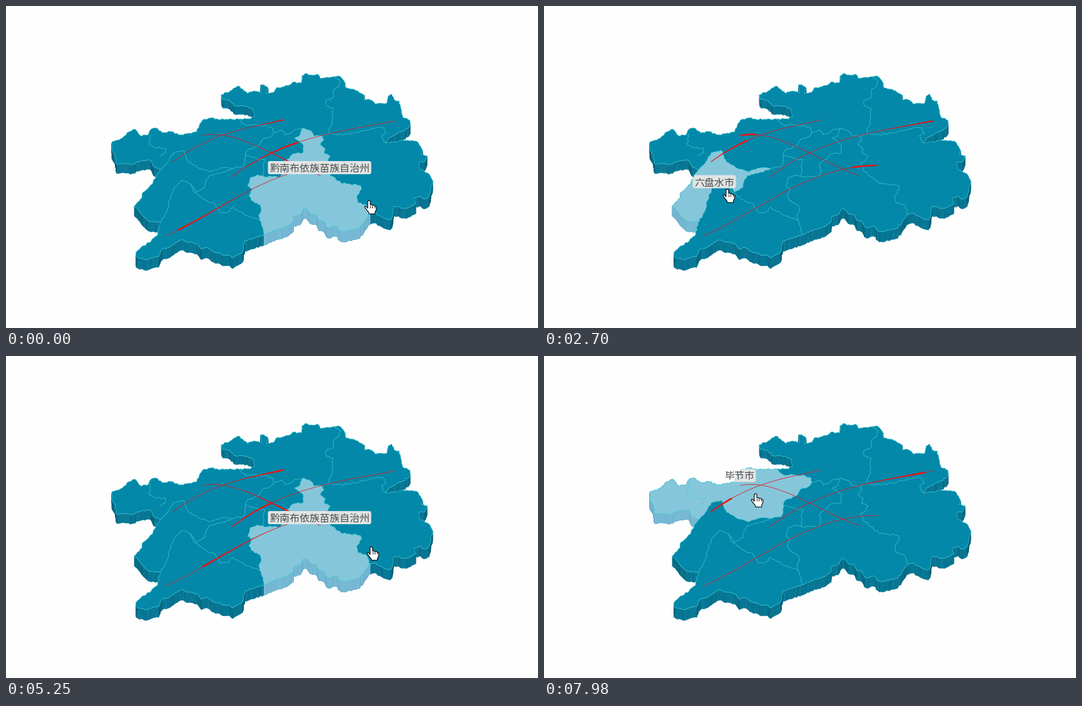
Write a matplotlib script that moves like this. It is 850x515 px and loops after 8 s.

```python
import numpy as np
import matplotlib.pyplot as plt
from matplotlib.animation import FuncAnimation
from matplotlib.collections import LineCollection, PolyCollection
from matplotlib.patches import FancyBboxPatch, Polygon

W, H, DPI = 850, 515, 100
LOOP, INTERVAL, TICK = 8000, 40, 135.3
PX = 72 / DPI
TOP, TOP_LIT, RIM, RED = "#0388a9", "#86c6da", "#43d3d8", "#ee1212"
WALL, WALL_LIT = np.array([.02, .47, .59]), np.array([.47, .73, .84])

# Borders between junctions; the two letters name the end junctions.
ARCS = {
    "ab": [247, 262, 236, 257, 231, 247, 216, 248, 202, 253, 177, 253, 175, 240, 169, 229,
           170, 217, 186, 211, 197, 201, 206, 197, 214, 207, 226, 207, 232, 197, 239, 195,
           250, 203, 263, 201, 280, 206, 296, 204, 305, 201, 310, 188, 317, 181, 328, 179,
           340, 182, 352, 181, 372, 181],
    "bc": [372, 181, 390, 181, 397, 176, 394, 165, 385, 160, 364, 159, 358, 152, 347, 150,
           344, 142, 358, 136, 370, 128, 378, 133, 386, 140, 396, 136, 408, 139, 407, 126,
           412, 126, 419, 132, 416, 140, 428, 138, 432, 131, 444, 129, 452, 127, 458, 122,
           472, 123, 473, 112, 478, 108, 490, 111, 498, 109, 502, 116, 514, 114, 524, 113],
    "cd": [524, 113, 534, 113, 540, 120, 543, 131, 552, 133, 562, 136, 568, 140, 573, 143,
           572, 150, 582, 150, 590, 157, 608, 156, 611, 144, 616, 141, 620, 150, 628, 152,
           634, 178, 645, 183, 646, 190, 638, 199, 625, 204, 614, 210, 606, 219],
    "de": [606, 219, 622, 217, 640, 215, 655, 216, 660, 222, 666, 232, 663, 238, 673, 240,
           668, 250, 660, 250, 662, 262, 675, 268, 682, 280, 679, 292, 676, 305, 668, 309,
           662, 304, 652, 308, 655, 316, 640, 324, 620, 320, 618, 334, 614, 342, 600, 337,
           588, 331, 582, 333],
    "ef": [582, 333, 576, 340, 570, 350, 562, 356, 545, 360, 536, 361, 527, 352, 518, 355,
           512, 353, 508, 345, 500, 343, 494, 333, 486, 332, 480, 324, 476, 324, 470, 334,
           460, 336, 459, 345, 450, 352, 435, 357, 412, 366],
    "fg": [412, 366, 395, 372, 381, 376, 378, 393, 370, 398, 362, 403, 357, 398, 345, 398,
           332, 393, 320, 386, 312, 389, 305, 380, 290, 378, 280, 374, 265, 383, 249, 390,
           244, 401, 230, 404, 223, 406, 208, 401, 208, 394, 218, 384, 232, 376, 243, 364,
           246, 346],
    "ga": [246, 346, 232, 345, 224, 341, 217, 334, 212, 327, 205, 320, 210, 314, 217, 307,
           219, 298, 234, 285, 240, 270, 247, 262],
    "bh": [372, 181, 376, 186, 385, 191, 398, 190, 418, 192, 427, 196, 428, 202],
    "hi": [428, 202, 440, 198, 446, 206, 456, 203, 462, 197, 473, 196],
    "ij": [473, 196, 482, 198, 490, 203, 492, 208, 505, 208],
    "jk": [505, 208, 517, 204],
    "kc": [517, 204, 517, 195, 522, 187, 521, 175, 522, 163, 512, 160, 511, 152, 524, 145,
           524, 133, 531, 129, 534, 120, 524, 113],
    "kd": [517, 204, 530, 206, 550, 204, 570, 200, 590, 195, 603, 195, 608, 203, 600, 208,
           606, 219],
    "je": [505, 208, 508, 214, 502, 222, 510, 228, 508, 236, 518, 240, 514, 248, 506, 252,
           510, 262, 522, 273, 535, 283, 550, 285, 566, 287, 568, 293, 560, 305, 563, 315,
           575, 318, 582, 333],
    "in": [473, 196, 470, 206, 461, 211, 475, 222, 474, 235, 460, 236, 450, 245, 440, 252,
           442, 265, 438, 273, 412, 273],
    "np": [412, 273, 402, 270, 390, 275, 386, 288, 394, 293, 388, 303, 392, 311, 406, 318,
           408, 325, 404, 335, 406, 343],
    "pf": [406, 343, 409, 352, 412, 366],
    "hm": [428, 202, 424, 208, 410, 213, 405, 222, 395, 228, 385, 231, 382, 238],
    "mn": [382, 238, 398, 243, 414, 246, 411, 258, 412, 273],
    "mr": [382, 238, 382, 248, 379, 257, 362, 260],
    "ra": [362, 260, 345, 259, 325, 265, 313, 261, 303, 255, 292, 250, 287, 240, 284, 231,
           267, 235, 258, 250, 247, 262],
    "rq": [362, 260, 345, 266, 325, 271, 320, 278, 318, 290, 304, 298, 294, 284],
    "qp": [294, 284, 301, 298, 318, 310, 335, 318, 343, 331, 355, 330, 362, 322, 375, 329,
           386, 336, 406, 343],
    "qg": [294, 284, 280, 279, 268, 292, 262, 310, 256, 330, 246, 346],
}
COASTS = ["ab", "bc", "cd", "de", "ef", "fg", "ga"]
SPUR = [231, 204, 229, 222, 237, 226, 256, 228, 255, 235, 246, 240]

# name: (ring of junctions, label centre)
REGIONS = {
    "黔南布依族苗族自治州": ("efpnij", (501, 258.5)),
    "铜仁市": ("cdk", (622, 167.5)),
    "毕节市": ("abhmr", (312, 191)),
    "黔西南布依族苗族自治州": ("fgqp", (252, 351)),
    "黔东南苗族侗族自治州": ("dejk", (598, 250)),
    "遵义市": ("bckjih", (455, 157)),
    "贵阳市": ("hinm", (431, 232)),
    "六盘水市": ("garq", (272, 281)),
    "安顺市": ("mnpqr", (356, 300)),
}
(QIANNAN, TONGREN, BIJIE, QIANXINAN, QIANDONGNAN,
 ZUNYI, GUIYANG, LIUPANSHUI, ANSHUN) = REGIONS

# (start ms, hovered region)
HOVER = [(0, QIANNAN), (260, QIANDONGNAN), (660, TONGREN), (1420, QIANNAN),
         (1550, GUIYANG), (1690, BIJIE), (2500, LIUPANSHUI), (2900, QIANXINAN),
         (3800, ANSHUN), (4130, QIANNAN), (5390, QIANDONGNAN), (5900, TONGREN),
         (6600, ZUNYI), (7350, BIJIE)]
# Pointer tip: ms, x, y
POINTER = np.array([
    (0, 580, 311), (400, 603, 250), (800, 585, 185), (1100, 540, 190), (1350, 487, 205),
    (1650, 420, 207), (1920, 366, 206), (2400, 318, 250), (2900, 277, 320),
    (3510, 274, 349), (3900, 350, 325), (4300, 430, 325), (4800, 525, 318),
    (5250, 582, 308), (5600, 605, 270), (5950, 595, 200), (6330, 569, 196),
    (6750, 490, 180), (7250, 408, 190), (7600, 360, 210), (7980, 338, 220)])

# Flight paths in travel order, with the head's position at time zero.
FLIGHTS = [
    ([267, 249, 303, 226, 345, 207, 390, 194, 443, 182], 1.16),
    ([314, 207, 345, 207, 375, 213, 425, 236, 470, 257, 502, 271], .92),
    ([361, 273, 425, 235, 465, 218, 520, 204, 570, 193, 621, 184], .42),
    ([532, 255, 490, 259, 448, 269, 400, 290, 330, 328, 256, 367], .935),
]
SPEED, CYCLE, TAIL, HEAD_WIDTH = .2555e-3, 1.5, .45, 2.7


def pairs(flat):
    return np.array(flat, float).reshape(-1, 2)


def roughen(flat, seed, step=3.0, amount=1.25):
    """Break a polyline into short, slightly ragged pieces."""
    rng = np.random.RandomState(seed)
    pts = pairs(flat)
    out = [pts[:1]]
    for p, q in zip(pts, pts[1:]):
        length = np.hypot(*(q - p))
        n = max(1, int(length / step))
        s = np.linspace(0, 1, n + 1)[1:, None]
        offset = rng.uniform(-amount, amount, (n, 1))
        offset[-1] = 0
        normal = np.array([p[1] - q[1], q[0] - p[0]]) / length
        out.append(p + (q - p) * s + normal * offset)
    return np.vstack(out)


arcs = {key: roughen(flat, i) for i, (key, flat) in enumerate(ARCS.items())}


def ring(nodes):
    parts = []
    for a, b in zip(nodes, nodes[1:] + nodes[0]):
        parts.append(arcs[a + b] if a + b in arcs else arcs[b + a][::-1])
    return np.vstack(parts)


def walls(coast, base):
    """Vertical faces hanging from a coast line, shaded by direction."""
    quads, colors = [], []
    for p, q in zip(coast, coast[1:]):
        d = q - p
        quads.append([p, q, q + (0, drop(q)), p + (0, drop(p))])
        shade = .68 + .32 * abs(d[0]) / (np.hypot(*d) + 1e-6)
        colors.append(tuple(base * (shade if base is WALL else .8 + shade / 5)))
    return quads, colors


def drop(p):
    return 13 + (p[1] - 110) * .014


def add_walls(keys, base, z):
    quads, colors = [], []
    for key in keys:
        new_quads, new_colors = walls(arcs[key], base)
        quads += new_quads
        colors += new_colors
    return ax.add_collection(PolyCollection(quads, facecolors=colors, edgecolors=colors,
                                            linewidths=.4 * PX, zorder=z))


def flight_path(flat, samples=110):
    pts = pairs(flat)
    mid = pts[:, 0].mean()
    fit = np.polyfit(pts[:, 0] - mid, pts[:, 1], 4)
    x = np.linspace(pts[0, 0], pts[-1, 0], 400)
    y = np.polyval(fit, x - mid)
    s = np.r_[0, np.cumsum(np.hypot(np.diff(x), np.diff(y)))]
    even = np.linspace(0, s[-1], samples)
    return np.column_stack([np.interp(even, s, x), np.interp(even, s, y)])


fig = plt.figure(figsize=(W / DPI, H / DPI), dpi=DPI, facecolor="#fefefe")
ax = fig.add_axes([0, 0, 1, 1])
ax.set_xlim(0, W)
ax.set_ylim(H, 0)
ax.axis("off")

# Map block
add_walls(COASTS, WALL, 1)
shore = np.vstack([arcs[key] for key in COASTS])
land = ax.add_patch(Polygon(shore, fc=TOP, ec="none", zorder=2))
lines = list(arcs.values()) + [roughen(SPUR, 99)]
ax.add_collection(LineCollection(lines, colors=RIM, linewidths=.75 * PX, alpha=.85, zorder=4))

# Hover state and label of each region
hover = {}
for name, (nodes, (cx, cy)) in REGIONS.items():
    coast = [a + b for a, b in zip(nodes, nodes[1:] + nodes[0]) if a + b in COASTS]
    half = 8 * len(name) + 1
    box = FancyBboxPatch((cx - half, cy - 9), 2 * half, 18, fc="#e1e4e5", ec="none",
                         boxstyle="round,pad=1.5,rounding_size=3", zorder=8)
    ax.add_patch(box)
    box.set_clip_path(land)
    parts = [ax.add_patch(Polygon(ring(nodes), fc=TOP_LIT, ec="none", zorder=3)), box,
             ax.text(cx, cy, name, family="Noto Sans CJK JP", size=16 * PX, color="#4c4c4c",
                     ha="center", va="center_baseline", zorder=9)]
    if coast:
        parts.append(add_walls(coast, WALL_LIT, 1.5))
    hover[name] = parts

# Flights
flights = []
for flat, start in FLIGHTS:
    path = flight_path(flat)
    ax.plot(*path.T, color="#e01820", lw=.8 * PX, zorder=5)
    trail = LineCollection(np.stack([path[:-1], path[1:]], axis=1), colors=RED,
                           capstyle="round", zorder=6)
    ax.add_collection(trail)
    flights.append((trail, start, np.linspace(0, 1, len(path) - 1)))

# Pointer hand
HAND = pairs([-2, 1, 0, 0, 2, 1, 2, 7, 4, 6.5, 6, 8, 8, 7.5, 9.5, 9, 11.5, 9.5, 12, 12,
              11.5, 15, 10, 18, 9.5, 21.5, 0, 21.5, -.5, 19, -3, 16, -6, 12, -7, 10,
              -5.5, 9, -4, 10, -2, 12.5])
FINGERS = [pairs([x, 7.5 + x / 8, x, 12]) for x in (2, 5.5, 8.8)]
hand = ax.add_patch(Polygon(HAND, fc="white", ec="black", lw=1.1 * PX, zorder=11))
fingers = ax.add_collection(LineCollection(FINGERS, colors="black", linewidths=.9 * PX, zorder=12))


def update(frame):
    t = int((frame * INTERVAL + INTERVAL / 2 + 30) / TICK) * TICK
    current = [name for start, name in HOVER if start <= t][-1]
    for name, parts in hover.items():
        for part in parts:
            part.set_visible(name == current)
    for trail, start, s in flights:
        lag = (start + t * SPEED) % CYCLE - s
        shown = (lag >= 0) & (lag < TAIL)
        trail.set_linewidths(np.where(shown, HEAD_WIDTH * (1 - lag / TAIL), 0) * PX)
    tip = [np.interp(t, POINTER[:, 0], POINTER[:, i]) for i in (1, 2)]
    hand.set_xy(HAND + tip)
    fingers.set_segments([f + tip for f in FINGERS])
    return []


anim = FuncAnimation(fig, update, frames=LOOP // INTERVAL, interval=INTERVAL,
                     repeat=True, repeat_delay=0, blit=False)
plt.show()
```
